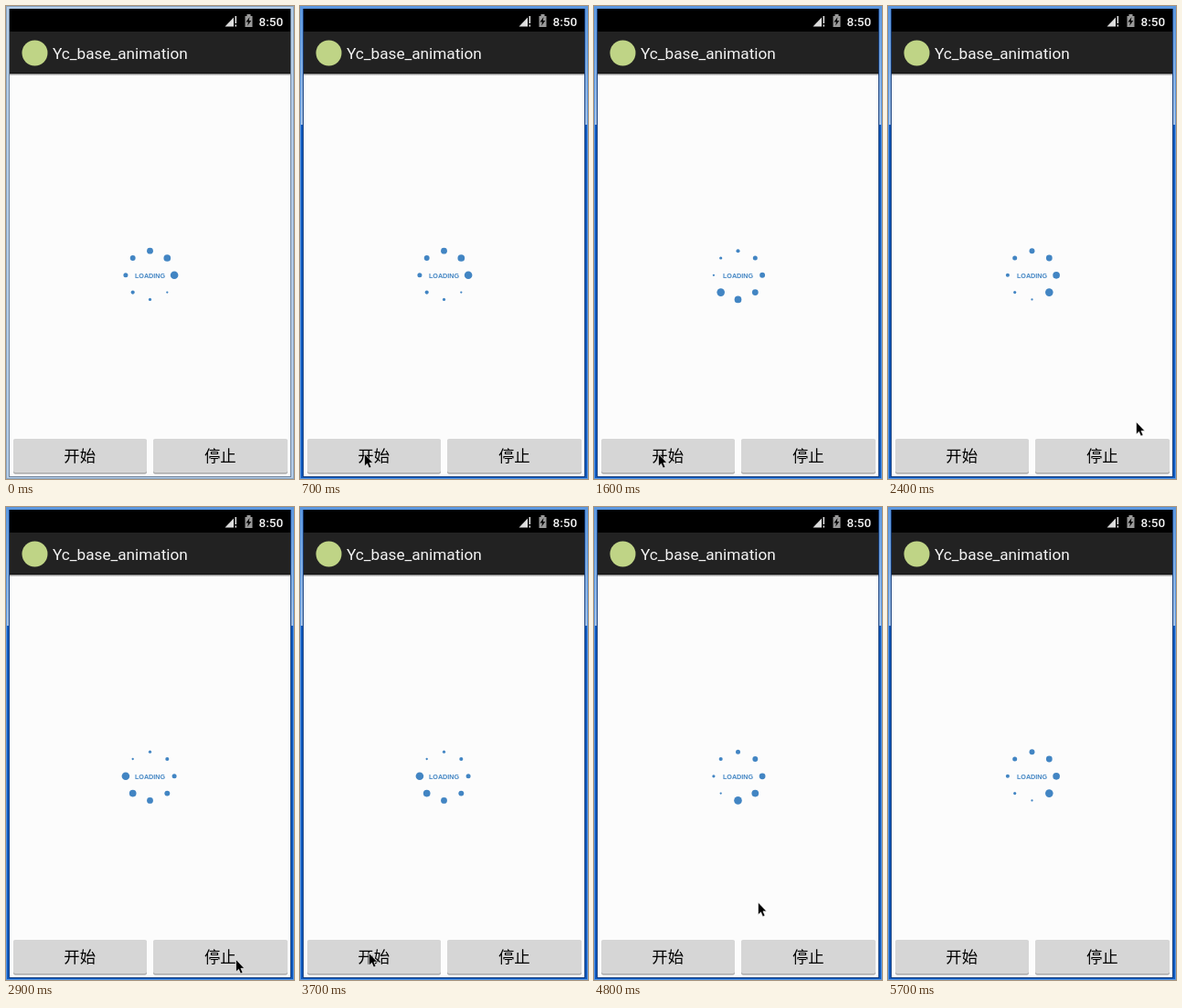
An HTML page that plays this animation: 315x518 px, repeating every 5.9 s.

```html
<!DOCTYPE html>
<html lang="zh">
<head>
<meta charset="utf-8">
<title>Loading animation</title>
<style>
  html, body { margin: 0; width: 100%; height: 100%; overflow: hidden; }
  svg { display: block; width: 315px; height: 518px; }
  .ui { font-family: Roboto, sans-serif; }
  .label { font: 17.4px "Noto Sans CJK SC", "Noto Sans CJK", sans-serif; text-anchor: middle; }
  .lip { fill: #a8a8a8; }
  .face { fill: #d6d6d6; }
  .pressed .face { fill: #bcbcbc; }
  .rim { fill: #8aa5c2; }
  .glass { fill: #b5cee9; }
  .inner { fill: #6d8199; }
  .focused .rim { fill: #5b97df; }
  .focused .glass { fill: url(#glass); }
  .focused .inner { fill: #173f7d; }
</style>
</head>
<body>
<svg id="stage" viewBox="0 0 315 518">
  <defs>
    <linearGradient id="glass" x2="0" y2="1">
      <stop offset="0" stop-color="#5b97df"/>
      <stop offset=".25" stop-color="#a6c5ea"/>
      <stop offset=".25" stop-color="#0f5ac0"/>
    </linearGradient>
    <linearGradient id="shade" x2="0" y2="1">
      <stop offset="0" stop-color="#999"/>
      <stop offset="1" stop-color="#fcfcfc"/>
    </linearGradient>
  </defs>

  <rect class="rim" width="315" height="518"/>
  <rect class="glass" x="1" y="1" width="313" height="516"/>
  <rect class="inner" x="3" y="3" width="309" height="513"/>
  <rect x="4" y="4" width="307" height="511" fill="#fcfcfc"/>

  <rect x="4" y="3" width="307" height="25"/>
  <path d="M239.500 22.500L249 12.500V22.500Z" fill="#ddd"/>
  <path d="M250.500 11h1.600v8h-1.600zM250.500 20.500h1.600v2h-1.600z" fill="#ddd"/>
  <path d="M261.500 11h2V9h4v2h2v12h-8z" fill="#999"/>
  <path d="M266.500 12l-4 5.500h2.500l-.8 4 4-5.500h-2.500z"/>
  <text class="ui" x="276.500" y="21.500" font-size="13.500" font-weight="500" fill="#f4f4f4">8:50</text>

  <rect x="4" y="28" width="307" height="46" fill="#222"/>
  <rect x="4" y="73" width="307" height="1.500" fill="#111"/>
  <rect x="4" y="74.500" width="307" height="2" fill="url(#shade)"/>
  <circle cx="31.500" cy="51.500" r="14" fill="#bfd486"/>
  <text class="ui" x="51" y="57.500" font-size="17.200" fill="#f3f3f3">Yc_base_animation</text>

  <g id="dots" fill="#4285c3"></g>
  <text x="157.500" y="297.500" font-family="Liberation Sans, Arial, sans-serif" font-size="7.200" font-weight="bold" text-anchor="middle" fill="#4285c3">LOADING</text>

  <g id="start" transform="translate(8 474)">
    <rect class="lip" y="1" width="146" height="37.500" rx="2"/>
    <rect class="face" width="146" height="37" rx="2"/>
    <text class="label" x="72.700" y="25">开始</text>
  </g>
  <g id="stop" transform="translate(161 474)">
    <rect class="lip" y="1" width="147" height="37.500" rx="2"/>
    <rect class="face" width="147" height="37" rx="2"/>
    <text class="label" x="73.300" y="25">停止</text>
  </g>

  <path id="cursor" d="M.5 0V13.500L3.500 10.700 5.600 15.500 8 14.500 5.900 9.800H9.800Z" stroke="#fff" stroke-width=".6"/>
</svg>
<script>
  const LOOP = 5900, TICK = 100, STEP = 140, COUNT = 8;
  const byId = id => document.getElementById(id);
  const stage = byId('stage'), cursor = byId('cursor');
  const within = (t, from, to) => t >= from && t < to;
  const ease = k => k * k * (3 - 2 * k);

  // Where the pointer turns or rests
  const stops = [
    { at: 100, x: 273, y: 236 },
    { at: 500, x: 70, y: 490.5 },
    { at: 1700, x: 70, y: 490.5 },
    { at: 2400, x: 271, y: 455.5 },
    { at: 2600, x: 251, y: 495.5 },
    { at: 3300, x: 251, y: 495.5 },
    { at: 3700, x: 75, y: 488.5 },
    { at: 4400, x: 75, y: 488.5 },
    { at: 4800, x: 179, y: 433 },
    { at: 5200, x: 235, y: 411 }
  ];

  const dots = Array.from({ length: COUNT }, (_, i) => {
    const dot = document.createElementNS('http://www.w3.org/2000/svg', 'circle');
    const angle = i * 2 * Math.PI / COUNT;
    dot.setAttribute('cx', 157.5 + 26.6 * Math.cos(angle));
    dot.setAttribute('cy', 294.8 + 26.6 * Math.sin(angle));
    byId('dots').append(dot);
    return dot;
  });

  // Each run starts with the largest dot at the upper right.
  function headAt(t) {
    if (t < 1000) return 0;
    const elapsed = t < 4300 ? Math.min(t, 2900) - 1000 : t - 4290;
    return (7 + Math.floor(elapsed / STEP)) % COUNT;
  }

  function pointerAt(t) {
    const next = stops.findIndex(stop => stop.at > t);
    if (next < 1) return null;
    const a = stops[next - 1], b = stops[next];
    const k = ease((t - a.at) / (b.at - a.at));
    return [a.x + (b.x - a.x) * k, a.y + (b.y - a.y) * k];
  }

  function draw(now) {
    const t = Math.floor(now % LOOP / TICK) * TICK;
    const head = headAt(t), pointer = pointerAt(t);
    dots.forEach((dot, i) => {
      const age = (head - i + COUNT) % COUNT;
      dot.setAttribute('r', 4.3 - 0.45 * age);
    });
    stage.classList.toggle('focused', t >= 700);
    byId('start').classList.toggle('pressed', within(t, 800, 1000) || within(t, 4100, 4300));
    byId('stop').classList.toggle('pressed', within(t, 2700, 2900));
    cursor.style.display = pointer ? '' : 'none';
    if (pointer) cursor.setAttribute('transform', `translate(${pointer})`);
  }

  const begin = performance.now();
  function frame() {
    draw(performance.now() - begin);
    requestAnimationFrame(frame);
  }
  frame();
</script>
</body>
</html>
```
